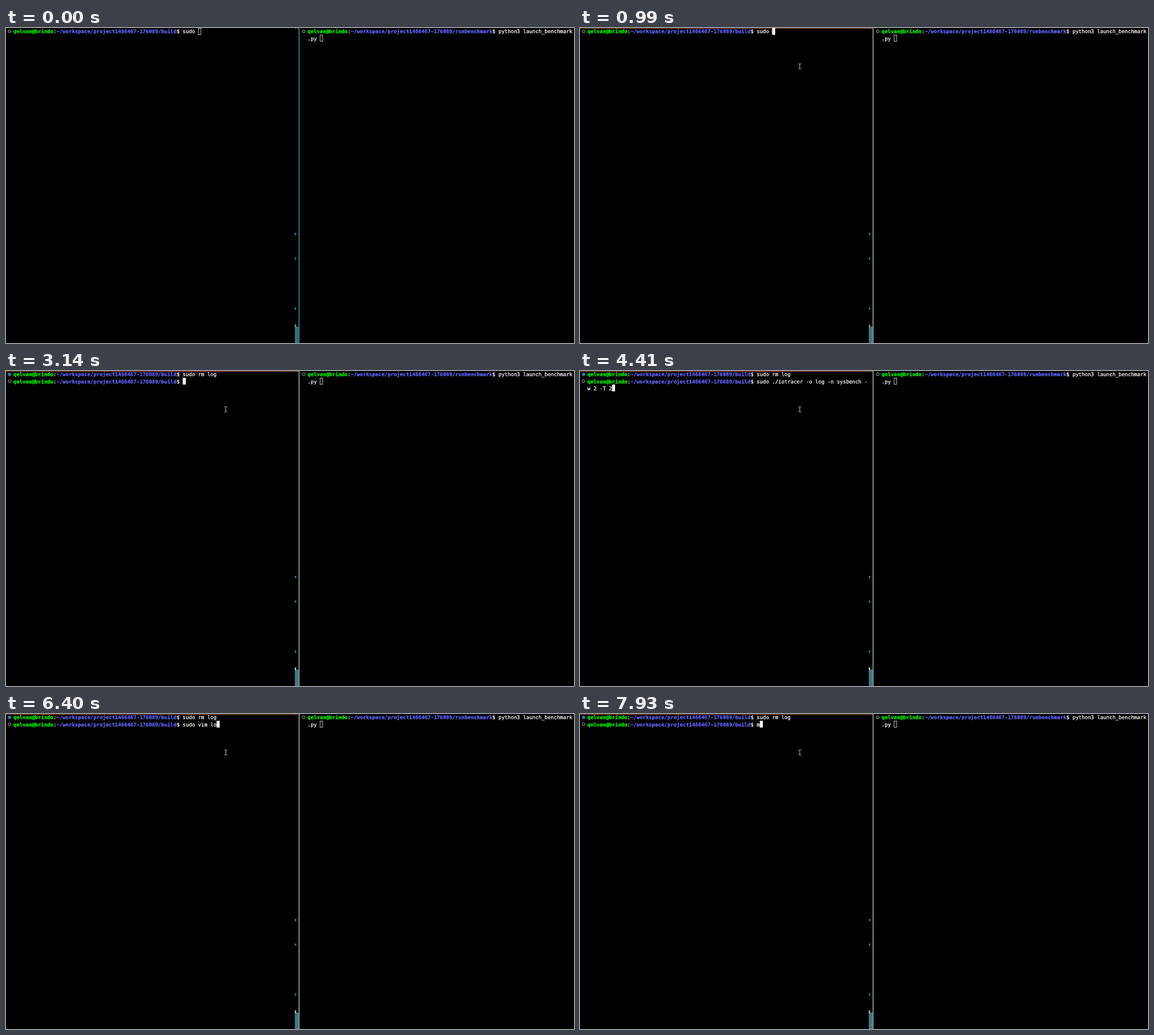
An HTML page with a canvas for the animation above (8000 ms loop, 1004 px wide and 558 px high).

```html
<!DOCTYPE html>
<html lang="en">
<head>
<meta charset="utf-8">
<title>Split terminal</title>
<style>
  html, body { margin: 0; width: 100%; height: 100%; overflow: hidden; background: #000; }
  canvas { display: block; }
</style>
</head>
<body>
<canvas id="stage" width="1004" height="558"></canvas>
<script>
const ctx = document.getElementById('stage').getContext('2d');
const LOOP = 8000;
const CELL_W = 5.443, ROW_H = 12.2, BASELINE = 9.4;
const FONT = '9.04px "DejaVu Sans Mono", monospace';
const WHITE = '#fff', GREEN = '#00ff00', BLUE = '#6464ff';
const LEFT = { x: 13, cols: 91, dir: 'build' };
const RIGHT = { x: 533, cols: 86, dir: 'runbenchmark' };
const VIM = 'sudo vim log';

// Times at which the command line takes a new value.
const firstLine = [
  [0, 'sudo '], [1990, 'sudo r'], [2120, 'sudo rm'], [2260, 'sudo rm '],
  [2530, 'sudo rm l'], [2730, 'sudo rm lo'], [2860, 'sudo rm log']
];
const secondLine = [
  [3140, ''], [4010, 'sudo rm log'], [4140, VIM],
  [4410, 'sudo ./iotracer -o log -n sysbench -w 2 -T 2'],
  [5210, VIM], [6400, VIM.slice(0, 11)],
  ...[9, 7, 5, 3, 1, 0].map((n, i) => [6930 + i * 68, VIM.slice(0, n)]),
  [7930, 'm']
];

const valueAt = (steps, t) => steps.filter(s => s[0] <= t).pop()[1];

function rect(x, y, w, h, color) {
  ctx.fillStyle = color;
  ctx.fillRect(x, y, w, h);
}

// Writes coloured runs on the cell grid, wrapping at the pane edge; returns the end cell.
function write(pane, row, runs) {
  let col = 0;
  ctx.lineWidth = 0.25;
  for (const [text, color, bold] of runs) {
    ctx.font = (bold ? 'bold ' : '') + FONT;
    ctx.fillStyle = ctx.strokeStyle = color;
    for (const char of text) {
      if (col === pane.cols) { col = 0; row++; }
      const x = pane.x + col++ * CELL_W, y = row * ROW_H + BASELINE;
      ctx.fillText(char, x, y);
      ctx.strokeText(char, x, y);
    }
  }
  return { col, row };
}

function promptLine(pane, row, command, done) {
  ctx.beginPath();
  ctx.arc(pane.x - 6.7, row * ROW_H + 5.9, done ? 2.9 : 2.4, 0, Math.PI * 2);
  if (done) {
    ctx.fillStyle = '#1b81a8';
    ctx.fill();
  } else {
    ctx.strokeStyle = '#8c8c8c';
    ctx.lineWidth = 1.1;
    ctx.stroke();
  }
  return write(pane, row, [
    ['qelvan@brindo', GREEN, true],
    [':', WHITE],
    ['~/workspace/project1466467-176089/' + pane.dir, BLUE, true],
    ['$ ' + command, WHITE]
  ]);
}

function cursor(pane, { col, row }, filled) {
  const x = pane.x + col * CELL_W, y = Math.round(row * ROW_H);
  if (filled) {
    rect(x, y, CELL_W, 12, '#fff');
  } else {
    ctx.strokeStyle = '#d0d0d0';
    ctx.lineWidth = 0.9;
    ctx.strokeRect(x + 0.4, y + 0.5, CELL_W - 0.8, 11);
  }
}

function pointer(t) {
  if (t < 70) return;
  const step = Math.min(11, Math.floor((t - 70) / 70.9 + 0.01));
  const left = (1 - step / 11) ** 2;
  const x = Math.round(388 + 552 * left), y = Math.round(68 + 486 * left);
  const color = '#c4c4c4';
  rect(x, y - 4, 1, 8, color);
  for (const dy of [-5, 4]) {
    rect(x - 2, y + dy, 2, 1, color);
    rect(x + 1, y + dy, 2, 1, color);
  }
}

function frame(focused, finished) {
  if (focused) rect(0, 0, 517, 1, '#a4561a');
  rect(511, 0, 2, 1, '#9a9a9a');
  rect(514, 0, 3, 1, focused ? '#a4561a' : '#7c4444');
  rect(517, 0, 1, 558, focused ? '#a8763a' : '#34707c');
  rect(518, 0, 1, 558, focused ? '#4b9fc0' : '#2f6a7c');
  for (const y of [363, 406.5, 495]) rect(510.5, y, 2.5, 4, '#1b81a8');
  rect(510.5, 529, 6.5, 29, focused ? '#437888' : '#3c6b80');
  rect(510.5, 525, 2.3, 5, finished ? '#c4c4c4' : '#929292');
}

function draw(t) {
  const focused = t >= 930, finished = t >= 3140;
  rect(0, 0, 1004, 558, '#000');
  frame(focused, finished);

  promptLine(RIGHT, 0, 'python3 launch_benchmark');
  cursor(RIGHT, write(RIGHT, 1, [['.py ', WHITE]]), false);

  let end = promptLine(LEFT, 0, valueAt(firstLine, t), finished);
  if (finished) end = promptLine(LEFT, 1, valueAt(secondLine, t));
  else if (t >= 3070) end = { col: 0, row: 1 };
  cursor(LEFT, end, focused);
  pointer(t);
}

ctx.textRendering = 'geometricPrecision';
const start = performance.now();
function tick() {
  draw((performance.now() - start) % LOOP);
  requestAnimationFrame(tick);
}
tick();
</script>
</body>
</html>
```
